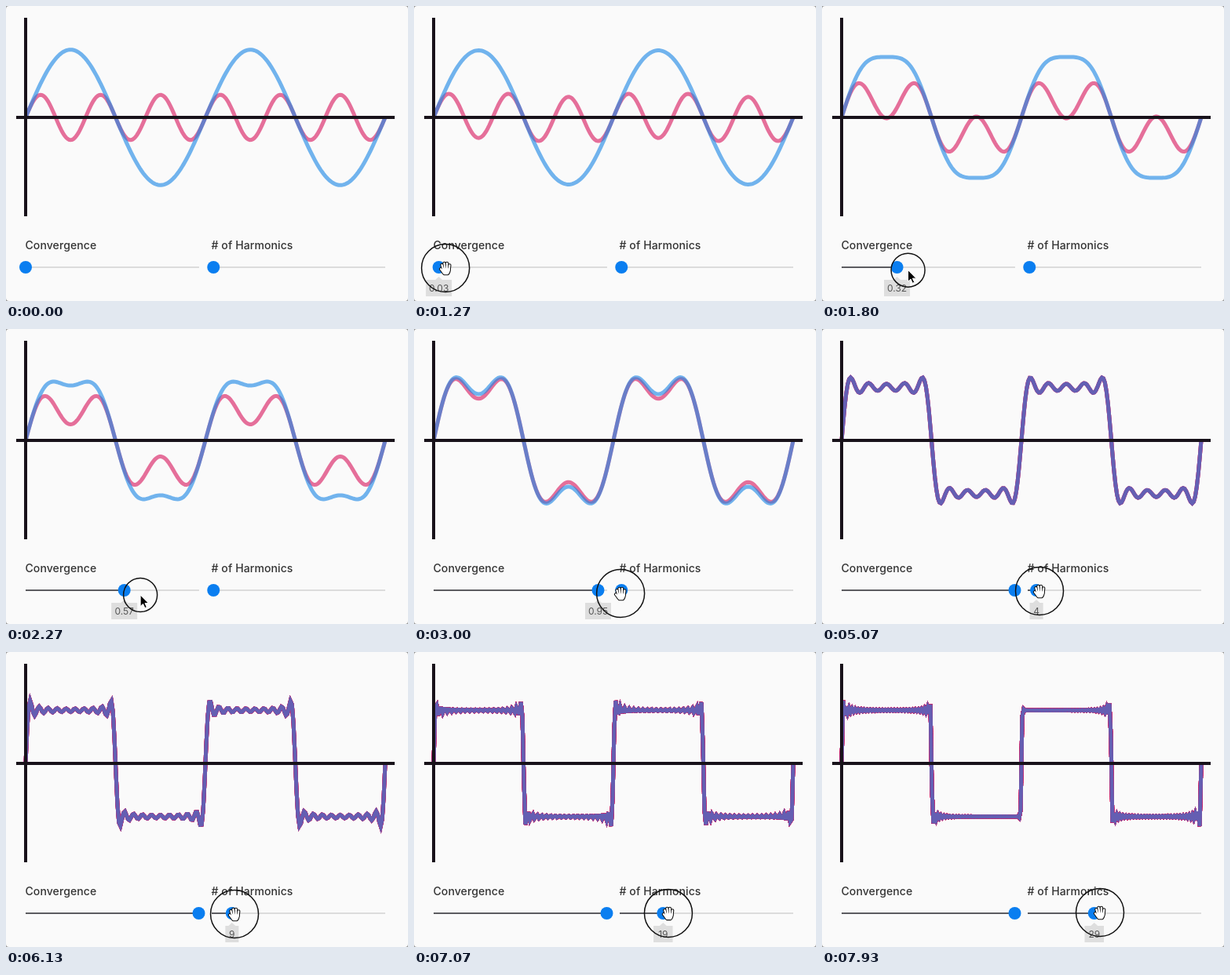
Animation of 512 by 376 pixels, one loop 8000 ms. Source, as an HTML page:

```html
<!DOCTYPE html>
<html lang="en">
<head>
<meta charset="utf-8">
<title>Fourier convergence</title>
<style>
  html, body { margin: 0; width: 100%; height: 100%; overflow: hidden; background: #999; }
  svg { display: block; width: 512px; height: 376px; background: #fafafa; border-radius: 4px; }
  text { font-family: Inter, Roboto, sans-serif; }
  .label { font-size: 14px; font-weight: 500; fill: #333; letter-spacing: .1px; }
  .value { font-size: 12px; fill: #555; text-anchor: middle; }
  .waves path { fill: none; stroke-width: 5; stroke-opacity: .62; }
  .axes { stroke: #18121a; stroke-width: 4; }
  .track { stroke: #dcdcdc; stroke-width: 2; }
  .fill { stroke: #5c5c60; stroke-width: 2; }
  .thumb { fill: #0a7ef0; }
  .tip path, .tip rect { fill: #dedede; }
</style>
</head>
<body>
<svg viewBox="0 0 512 376">
  <defs>
    <g id="fingers" stroke-linecap="round" stroke-linejoin="round">
      <path d="M-4.6-3.8L-2.8 2M-1.6-6L-.6 1M1.9-6L1.9 1M5.2-3.6L4.4 3M-6 1.2L-3 5"/>
      <path d="M-3 1.5L4.6 1.5L4 5L2.8 7L-1.6 7L-3.4 4.5Z"/>
    </g>
  </defs>
  <g class="waves"></g>
  <path class="axes" d="M13 142H495M25 15V268"/>
  <text class="label" x="24.5" y="310">Convergence</text>
  <text class="label" x="261.5" y="310"># of Harmonics</text>
  <g id="convergence"></g>
  <g id="harmonics"></g>
  <g id="cursor">
    <circle fill="none" stroke="#111" stroke-width="1.5"/>
    <path id="arrow" d="M0 0V14.5L3.4 11.4L5.8 16.6L8.2 15.5L5.8 10.5H10.4Z" fill="#000" stroke="#fff"/>
    <g id="hand">
      <use href="#fingers" fill="#111" stroke="#111" stroke-width="4.4"/>
      <use href="#fingers" fill="#fff" stroke="#fff" stroke-width="2.3"/>
    </g>
  </g>
</svg>
<script>
const LOOP = 8000, SAMPLES = 240, AMPLITUDE = 86.3, TRACK = 221;
const $ = selector => document.querySelector(selector);

// Each key is [time, ...values]; values are interpolated linearly.
const convergenceKeys = [[1215, 0], [1270, .03], [2270, .57], [3000, .95], [3096, 1]];
const harmonicKeys = [[4430, 1], [5070, 4], [6130, 9], [7930, 29]];
const cursorKeys = [
  [530, -25, 400], [1080, 33, 334], [1270, 40, 334], [2270, 171, 339], [3000, 263, 337],
  [3200, 284, 337], [3900, 270, 334], [4400, 268, 334], [5070, 277, 334],
  [6130, 291, 334], [7930, 354, 332]
];

function valuesAt(keys, time) {
  const next = keys.findIndex(key => key[0] > time);
  if (next === 0) return keys[0].slice(1);
  if (next < 0) return keys[keys.length - 1].slice(1);
  const a = keys[next - 1], b = keys[next];
  const part = (time - a[0]) / (b[0] - a[0]);
  return a.slice(1).map((value, i) => value + (b[i + 1] - value) * part);
}

const angles = Array.from({ length: SAMPLES }, (_, i) => 4 * Math.PI * i / (SAMPLES - 1));

function wavePath(values, color) {
  const points = values.map((v, i) =>
    `${(25 + 458 * i / (SAMPLES - 1)).toFixed(2)} ${(142 - AMPLITUDE * v).toFixed(2)}`);
  return `<path stroke="${color}" d="M${points.join('L')}"/>`;
}

// Every wave keeps its own term and takes in the others as convergence grows.
function drawWaves(convergence, harmonics) {
  const terms = Array.from({ length: harmonics + 1 }, (_, k) =>
    angles.map(x => Math.sin((2 * k + 1) * x) / (2 * k + 1)));
  const total = angles.map((_, i) => terms.reduce((sum, term) => sum + term[i], 0));
  const paths = terms.map((term, k) => wavePath(
    term.map((own, i) => own + convergence * (total[i] - own)),
    k ? '#d81b60' : '#1e88e5'));
  $('.waves').innerHTML = paths.reverse().join('');
}

function drawSlider(id, left, thumb, label, tipVisible) {
  const width = 9.5 + (label.length === 4 ? 23.5 : 7.5 * label.length);
  const tip = `<g class="tip" transform="translate(${thumb} 0)">
    <path d="M-5 349.5L0 345L5 349.5Z"/>
    <rect x="${-width / 2}" y="349" width="${width}" height="21"/>
    <text class="value" y="364">${label}</text></g>`;
  $(id).innerHTML = `<path class="track" d="M${left} 333h${TRACK}"/>
    <path class="fill" d="M${left} 333H${thumb}"/>
    <circle class="thumb" cx="${thumb}" cy="333" r="8"/>${tipVisible ? tip : ''}`;
}

function drawCursor(x, y, visible, overThumb) {
  $('#cursor').setAttribute('visibility', visible ? 'visible' : 'hidden');
  $('#cursor').setAttribute('transform', `translate(${x} ${y})`);
  $('#cursor circle').setAttribute('r', overThumb ? 30.5 : 21.5);
  $('#arrow').style.display = overThumb ? 'none' : '';
  $('#hand').style.display = overThumb ? '' : 'none';
}

let drawn = '';
function render(time) {
  const convergence = Math.round(valuesAt(convergenceKeys, time)[0] * 100) / 100;
  const harmonics = Math.floor(valuesAt(harmonicKeys, time)[0] + .01);
  const state = `${convergence}/${harmonics}`;
  if (state !== drawn) drawWaves(convergence, harmonics);
  drawn = state;

  const thumbs = [25 + (TRACK - .5) * convergence, 261.3 + TRACK / 75 * harmonics];
  const [x, y] = valuesAt(cursorKeys, time);
  const overThumb = y < 345 && thumbs.some(thumb => Math.abs(x - thumb) < 14);
  const label = convergence % 1 ? convergence.toFixed(2) : String(convergence);
  drawSlider('#convergence', 25, thumbs[0], label, time > 1050 && time < 3250);
  drawSlider('#harmonics', 262, thumbs[1], String(harmonics), time > 3750);
  drawCursor(x, y, time >= 530, overThumb);
}

const start = performance.now();
function tick() {
  render((performance.now() - start) % LOOP);
  requestAnimationFrame(tick);
}
tick();
</script>
</body>
</html>
```
